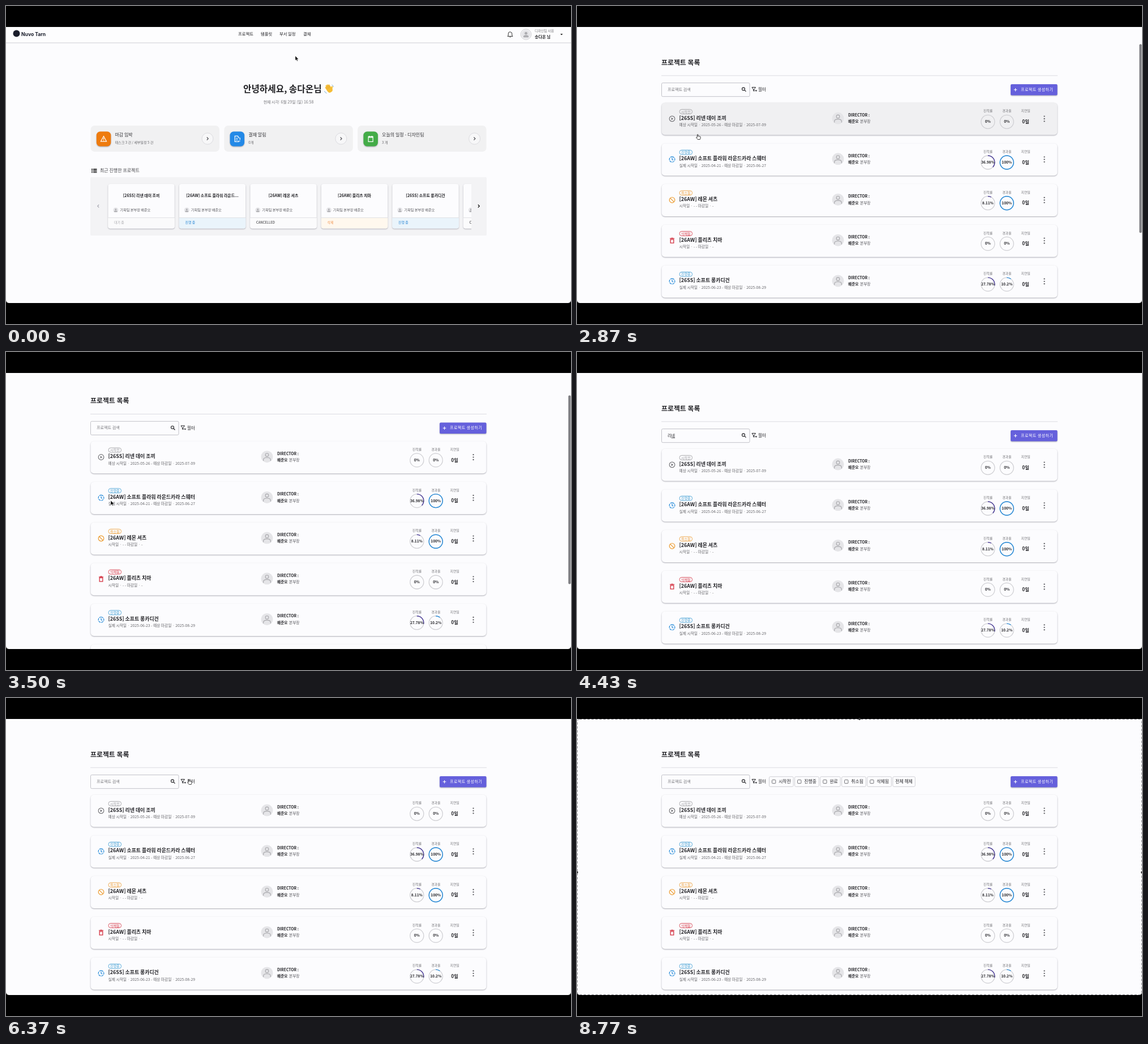
Recreate the animation shown at these times as an HTML page with a canvas. Size 998 by 561 pixels, loop 8.81 s.

```html
<!DOCTYPE html>
<html lang="ko">
<head>
<meta charset="utf-8">
<style>
html, body { margin: 0; width: 100%; height: 100%; overflow: hidden; background: #000; }
canvas { display: block; }
</style>
</head>
<body>
<canvas id="stage" width="998" height="561"></canvas>
<script>
const ctx = document.getElementById('stage').getContext('2d');
const LOOP = 8810, TOP = 37, VIEW = 487, BG = '#fcfcfe';
const FONT = '"Noto Sans CJK KR", "Noto Sans KR", "Noto Sans CJK JP", "Noto Sans", sans-serif';
const INK = '#222226', GRAY = '#77777b', BLUE = '#2188d8', ORANGE = '#ec9a2e', RED = '#d3303f';
const USER = '송다온', DIRECTOR = '배준오';

const STATUS = {
  ready: { label: '시작전', color: '#98989c', icon: '#77777b' },
  running: { label: '진행중', color: '#3a9bd2', icon: BLUE },
  cancelled: { label: '취소됨', color: ORANGE, icon: ORANGE },
  deleted: { label: '삭제됨', color: RED, icon: RED }
};
const PROJECTS = [
  { name: '[26SS] 리넨 데이 조끼', status: 'ready', done: 0, spent: 0,
    dates: '예상 시작일 · 2025-05-26 - 예상 마감일 · 2025-07-09' },
  { name: '[26AW] 소프트 플라워 라운드카라 스웨터', status: 'running', done: 36.98, spent: 100,
    dates: '실제 시작일 · 2025-04-21 - 예상 마감일 · 2025-06-27' },
  { name: '[26AW] 레몬 셔츠', status: 'cancelled', done: 8.11, spent: 100, dates: '시작일 · - - 마감일 · -' },
  { name: '[26AW] 플리츠 치마', status: 'deleted', done: 0, spent: 0, dates: '시작일 · - - 마감일 · -' },
  { name: '[26SS] 소프트 롱카디건', status: 'running', done: 27.78, spent: 10.2,
    dates: '실제 시작일 · 2025-06-23 - 예상 마감일 · 2025-08-29' },
  { name: '[26SS] 모던 리본 가방', status: 'ready', done: 0, spent: 0, dates: '시작일 · - - 마감일 · -' }
];

// Timeline: [time, value...]
const POINTER = [[0, 511, 88], [60, 511, 88], [520, 424, 48], [760, 424, 48], [1030, 400, 94], [2170, 400, 94],
  [2750, 213, 226], [2900, 213, 226], [3350, 185, 262], [3520, 185, 262], [3850, 218, 147], [5000, 218, 147],
  [5300, 294, 147], [5800, 294, 147], [6250, 323, 143], [6600, 323, 143], [6900, 347, 147],
  [7150, 347, 147], [7400, 392, 147], [7700, 392, 147], [8000, 576, 147], [8300, 576, 147], [8600, 640, 300]];
const SCROLL = [[0, 0], [2200, 0], [2800, 43.6], [3000, 43.6], [3400, 57], [3560, 57], [3800, 43.6]];
const QUERY = [[0, ''], [4050, 'ㄹ'], [4150, '리'], [4270, '린'], [4390, '리네'], [4530, '리넨'], [5750, '']];
const CHECKED = [[0, []], [7000, ['ready']], [7450, ['ready', 'running']], [8100, []]];

const latest = (steps, t) => steps.filter(s => s[0] <= t).pop()[1];
const within = (t, a, b) => t >= a && t < b;

function ease(track, t) {
  const i = track.findIndex(k => k[0] > t);
  if (i < 0) return track[track.length - 1].slice(1);
  const a = track[i - 1], b = track[i], p = (t - a[0]) / (b[0] - a[0]), e = p * p * (3 - 2 * p);
  return a.slice(1).map((v, j) => v + (b[j + 1] - v) * e);
}

function text(s, x, y, size, color = INK, weight = 400, align = 'left', spacing = 0) {
  ctx.font = `${weight} ${size}px ${FONT}`;
  ctx.textAlign = align;
  ctx.letterSpacing = spacing + 'px';
  ctx.fillStyle = color;
  ctx.fillText(s, x, y);
}

function paint(path, fill, stroke, width = 1) {
  if (fill) { ctx.fillStyle = fill; ctx.fill(path); }
  if (stroke) { ctx.strokeStyle = stroke; ctx.lineWidth = width; ctx.stroke(path); }
}

function box(x, y, w, h, r, fill, stroke, width) {
  const p = new Path2D();
  p.roundRect(x, y, w, h, r);
  paint(p, fill, stroke, width);
}

function circle(x, y, r, fill, stroke, width, share = 1) {
  const p = new Path2D();
  p.arc(x, y, r, -Math.PI / 2, Math.PI * (2 * share - .5));
  paint(p, fill, stroke, width);
}

function shape(x, y, d, fill, stroke, width, scale = 1) {
  ctx.save();
  ctx.translate(x, y);
  ctx.scale(scale, scale);
  paint(new Path2D(d), fill, stroke, width);
  ctx.restore();
}

function raised(draw) {
  ctx.save();
  ctx.shadowColor = 'rgba(30,30,50,.36)';
  ctx.shadowBlur = 2;
  ctx.shadowOffsetY = 1;
  draw();
  ctx.restore();
}

function avatar(x, y, r, outline) {
  circle(x, y, r, '#e5e5e8');
  const s = r / 10;
  const body = 'M-6 7V5Q-6 1.5 0 1.5T6 5V7';
  if (outline) {
    circle(x, y - 3 * s, 2.7 * s, null, '#a9a9ad', 1.1);
    shape(x, y, body, null, '#a9a9ad', 1.1, s);
  } else {
    circle(x, y - 2.5 * s, 3.3 * s, '#adadb1');
    shape(x, y, body + 'Z', '#adadb1', null, 1, s);
  }
}

function header(listPage) {
  box(0, TOP, 998, 28, 0, '#fdfdfe');
  box(0, 64.5, 998, 1, 0, '#cfcfd5');
  circle(18.5, 48.5, 6, '#1a1d2b');
  ctx.font = '700 8.6px Inter, sans-serif';
  ctx.textAlign = 'left';
  ctx.letterSpacing = '0px';
  ctx.fillText('Nuvo Tarn', 27, 53);
  [['프로젝트', 410], ['템플릿', 450], ['부서 일정', 483], ['결재', 525]].forEach(([s, x], i) =>
    text(s, x, 52.2, 7.3, listPage && !i ? '#4b43d6' : INK, 500));
  shape(890.5, 50, 'M-4.5 3.5H4.5L3.3 2V-1Q3.3 -4 0 -4.3T-3.3 -1V2ZM-1 5H1', null, '#333', 1);
  circle(918.5, 50, 9.3, '#f4f4f6', '#cfcfd3', 1);
  avatar(918.5, 50, 7.5);
  text('디자인팀 사원', 934, 46.3, 5.9, GRAY);
  text(USER + ' 님', 934, 56.7, 7.1, INK, 600);
  shape(981.3, 50, 'M-2.2 -1H2.2L0 1.4Z', '#222');
}

function wave(x, y) {
  ctx.save();
  ctx.translate(x, y);
  ctx.rotate(-.6);
  ctx.lineCap = 'round';
  shape(0, 0, 'M-3.5 1V-5M-1.2 0V-7M1.2 0V-7M3.5 1V-5.5M3 4L6.5 0', null, '#f6bd35', 2.3);
  box(-4.6, -2, 9.2, 9, 4, '#f6bd35');
  shape(0, 0, 'M-2.3 -1V-5M0 -1V-6M2.3 -1V-5', null, '#d6922a', .5);
  ctx.restore();
  shape(x, y, 'M5 -7Q7.5 -6 8 -3M-8 4Q-7 7 -4 8', null, '#7fb2d8', 1);
}

const chevron = (x, y, dir, color) =>
  shape(x, y, `M${-1.2 * dir} -2.5L${1.3 * dir} 0L${-1.2 * dir} 2.5`, null, color, 1.2);

function home() {
  text(`안녕하세요, ${USER}님`, 419, 152, 15.7, INK, 700);
  wave(570.5, 146);
  text('현재 시각: 6월 29일 (일) 16:58', 499, 172.3, 7, GRAY, 400, 'center');
  const icons = ['M0 -4.5L5 4.5H-5ZM0 -1.5V1.5M0 2.5V3.4', 'M3 -1V-2L1 -5H-4V5H3V3M-2 -1H1M-2 2H1M5 -2V2M5 3.4V4.4',
    'M-4 -4H4V5H-4ZM-4 -2.5H4M-2.3 -5.3V-3M2.3 -5.3V-3'];
  [['마감 임박', '태스크 3 건 / 세부일정 5 건', '#ee7b0e'], ['결재 알림', '0개', '#2389e7'],
   ['오늘의 일정 - 디자인팀', '3 개', '#44ac48']].forEach(([title, sub, color], i) => {
    const x = 149.5 + 235.8 * i;
    box(x, 211, 227.5, 46, 7, '#f1f1f2');
    raised(() => box(x + 10.3, 221.5, 25.5, 26, 6.5, color));
    shape(x + 23, 234.3, icons[i], null, '#fff', 1.2);
    text(title, x + 43, 230.3, 8, '#333337', 500);
    text(sub, x + 43, 243.3, 6.1, '#66666a');
    circle(x + 206.5, 234, 10, '#f7f7f8', '#dcdce0', 1);
    chevron(x + 206.5, 234, 1, '#55555a');
  });
  shape(151, 287.5, 'M0 .5H2M3 .5H9.5M0 3.2H2M3 3.2H9.5M0 5.9H2M3 5.9H9.5', null, '#333', 1.8);
  text('최근 진행한 프로젝트', 166, 293.2, 8, '#444448');
  box(149, 302, 700, 103, 2, '#f3f3f5');
  chevron(163, 353, -1, '#aaaab4');
  chevron(835, 353, 1, '#111');
  ctx.save();
  ctx.beginPath();
  ctx.rect(176, 304, 646, 99);
  ctx.clip();
  const states = [['대기 중', '#a6a6aa', '#fafafb'], ['진행 중', '#1f80d2', '#eaf4fb'], ['CANCELLED', INK, '#fbfbfc'],
    ['삭제', '#f0914a', '#fff8ee'], ['진행 중', '#1f80d2', '#eaf4fb'], ['CANCELLED', INK, '#fbfbfc']];
  states.forEach(([label, color, tint], i) => {
    const x = 180.3 + 125.5 * i, name = PROJECTS[i].name;
    raised(() => box(x, 314, 117.5, 78.5, 4, BG));
    box(x, 373.5, 117.5, 19, [0, 0, 4, 4], tint);
    box(x, 373, 117.5, .8, 0, '#d9dade');
    text(name.length > 20 ? name.slice(0, 18) + '...' : name, x + 58.7, 337, 6.9, INK, 600, 'center');
    avatar(x + 13.5, 360, 4.5);
    text(`기획팀 본부장 ${DIRECTOR}`, x + 21, 362, 6.2, '#55555a');
    text(label, x + 10.7, 384, 5.9, color);
  });
  ctx.restore();
}

function statusIcon(status, x, y) {
  const c = STATUS[status].icon;
  if (status === 'deleted') {
    shape(x, y, 'M-2.8 -2.2V4.2H2.8V-2.2ZM-4 -3.8H4M-1.4 -4.6H1.4', null, c, 1.3);
    return;
  }
  if (status === 'running') ctx.setLineDash([4.2, 1]);
  circle(x, y, 4.8, null, c, 1.2);
  ctx.setLineDash([]);
  if (status === 'ready') shape(x, y, 'M-1.4 -2.3L2.3 0L-1.4 2.3Z', c);
  else shape(x, y, status === 'running' ? 'M0 -2.8V0L2 1.4' : 'M-3.4 -3.4L3.4 3.4', null, c, 1.2);
}

function gauge(x, y, value, color) {
  circle(x, y, 12, null, '#d0d0d4', 1.3);
  if (value) circle(x, y, 12, null, color, 1.4, value / 100);
  text(value + '%', x, y + 2, 6.5, INK, 600, 'center');
}

function row(p, y, hovered) {
  raised(() => box(149.5, y, 699, 57, 6, hovered ? '#f0f0f2' : BG));
  const { label, color } = STATUS[p.status];
  statusIcon(p.status, 168, y + 28.3);
  box(181, y + 11.8, 22.6, 8, 4, null, color, .8);
  text(label, 192.3, y + 18, 6, color, 400, 'center');
  text(p.name, 180.5, y + 30, 8.9, INK, 600);
  text(p.dates, 180.5, y + 41.3, 6.75, '#66666a');
  avatar(461, y + 27.5, 10.5, true);
  text('DIRECTOR :', 479, y + 24.4, 6.8, INK, 600);
  text(DIRECTOR, 479, y + 35.6, 6.7, INK, 600);
  text('본부장', 500, y + 35.6, 6.7, '#55555a');
  ['진척률', '경과율', '지연일'].forEach((s, i) => text(s, 726 + 33.3 * i, y + 16.8, 5.9, GRAY, 400, 'center'));
  gauge(725.8, y + 33.7, p.done, '#4a3c97');
  gauge(759.2, y + 33.7, p.spent, BLUE);
  text('0일', 792.5, y + 36.3, 8.2, INK, 600, 'center');
  [24, 28.4, 32.8].forEach(d => circle(825.5, y + d, 1.15, '#55555a'));
}

function searchBar(t) {
  const query = latest(QUERY, t);
  box(149.5, 179.3, 155.5, 24, 2, null, '#c2c2c8', 1);
  text(query || '프로젝트 검색', 160, 193.3, 7.1, query ? INK : GRAY);
  if (query && t < 4870) {
    const end = 160 + ctx.measureText(query).width;
    box(end - 6.5, 194.8, 6.5, .8, 0, INK);
  }
  circle(294, 190, 2.5, null, INK, 1.1);
  shape(296, 192, 'M0 0L2.5 2.5', null, INK, 1.3);
  shape(309, 187, 'M0 0H6.5L4 3.5V7L2.5 6V3.5Z', null, INK, 1);
  shape(314.3, 192.2, 'M0 0H4L2 2.4Z', INK);
  text('필터', 320, 193.6, 7.6);
}

function filters(t) {
  const checked = latest(CHECKED, t);
  let x = 339.5;
  [['시작전', 'ready'], ['진행중', 'running'], ['완료', 'finished'], ['취소됨', 'cancelled'], ['삭제됨', 'deleted'],
   ['전체 해제']].forEach(([label, key]) => {
    const w = key ? (label.length === 2 ? 35.5 : 42.7) : 39.5;
    box(x, 182.4, w, 17.5, 2, BG, '#cfcfd4', 1);
    if (key) {
      const on = checked.includes(key);
      box(x + 5, 188, 6.3, 6.3, 1, on ? '#1976d2' : null, on ? '#1976d2' : '#707074', 1);
      if (on) shape(x + 5, 188, 'M1.2 3.2L2.7 4.7L5.2 1.6', null, '#fff', 1);
    }
    text(label, key ? x + 16.7 : x + w / 2, 193.6, 7.8, INK, 400, key ? 'left' : 'center');
    x += w + 2.4;
  });
}

function list(t) {
  text('프로젝트 목록', 149, 147.4, 11.9, INK, 600);
  box(149, 166, 700, .8, 0, '#d2d2d8');
  searchBar(t);
  if (t >= 6550) filters(t);
  raised(() => box(766, 181.5, 82.5, 19.5, 2, '#6560dc'));
  shape(774.5, 191.3, 'M-2.8 0H2.8M0 -2.8V2.8', null, '#fff', 1.1);
  text('프로젝트 생성하기', 784, 193.4, 7, '#fff', 500, 'left', .45);
  const checked = latest(CHECKED, t), searched = within(t, 4900, 5750);
  PROJECTS.filter(p => searched ? p.name.includes('리넨') : !checked.length || checked.includes(p.status))
    .forEach((p, i) => row(p, 214.2 + 71.7 * i, i === 0 && within(t, 2700, 2960)));
}

function pointer(t) {
  if (within(t, 3980, 4950) || t > 8600) return;
  const [x, y] = ease(POINTER, t);
  const hand = [[440, 850], [2700, 2960], [6150, 6700], [6850, 8350]].some(r => within(t, ...r));
  if (hand) shape(x - 2.5, y, 'M2 5V1Q2.8 0 3.6 1V4Q6 3.4 8 5V7.5L7 10H3L0 6.5Q0 5 2 6Z', '#fff', '#222', .9, .95);
  else shape(x, y, 'M0 0V9.5L2.2 7.6L3.7 11L5.2 10.3L3.7 7.1H6.6Z', '#000', '#fff', .5, .85);
}

function selection() {
  ctx.setLineDash([4, 3]);
  box(.5, TOP + .5, 997, VIEW - 1, 4, null, '#8a8a90', 1);
  ctx.setLineDash([]);
  [[499, TOP], [0, 307.5], [998, 307.5]].forEach(([x, y]) => circle(x, y, 2, '#333'));
}

function draw(t) {
  const listPage = t >= 700, [scroll] = ease(SCROLL, t);
  ctx.fillStyle = '#000';
  ctx.fillRect(0, 0, 998, 561);
  ctx.save();
  ctx.beginPath();
  ctx.roundRect(0, TOP, 998, VIEW, [0, 0, 5, 5]);
  ctx.clip();
  ctx.fillStyle = BG;
  ctx.fillRect(0, TOP, 998, VIEW);
  ctx.save();
  ctx.translate(0, -scroll);
  header(listPage);
  if (listPage) list(t); else home();
  ctx.restore();
  if (within(t, 2200, 3850)) box(993.3, TOP + .684 * scroll + .5, 4.2, 333, 2, '#7e7e82');
  pointer(t);
  ctx.restore();
  if (t >= 8600) selection();
}

function tick() {
  draw(performance.now() % LOOP);
  requestAnimationFrame(tick);
}
tick();
</script>
</body>
</html>
```
